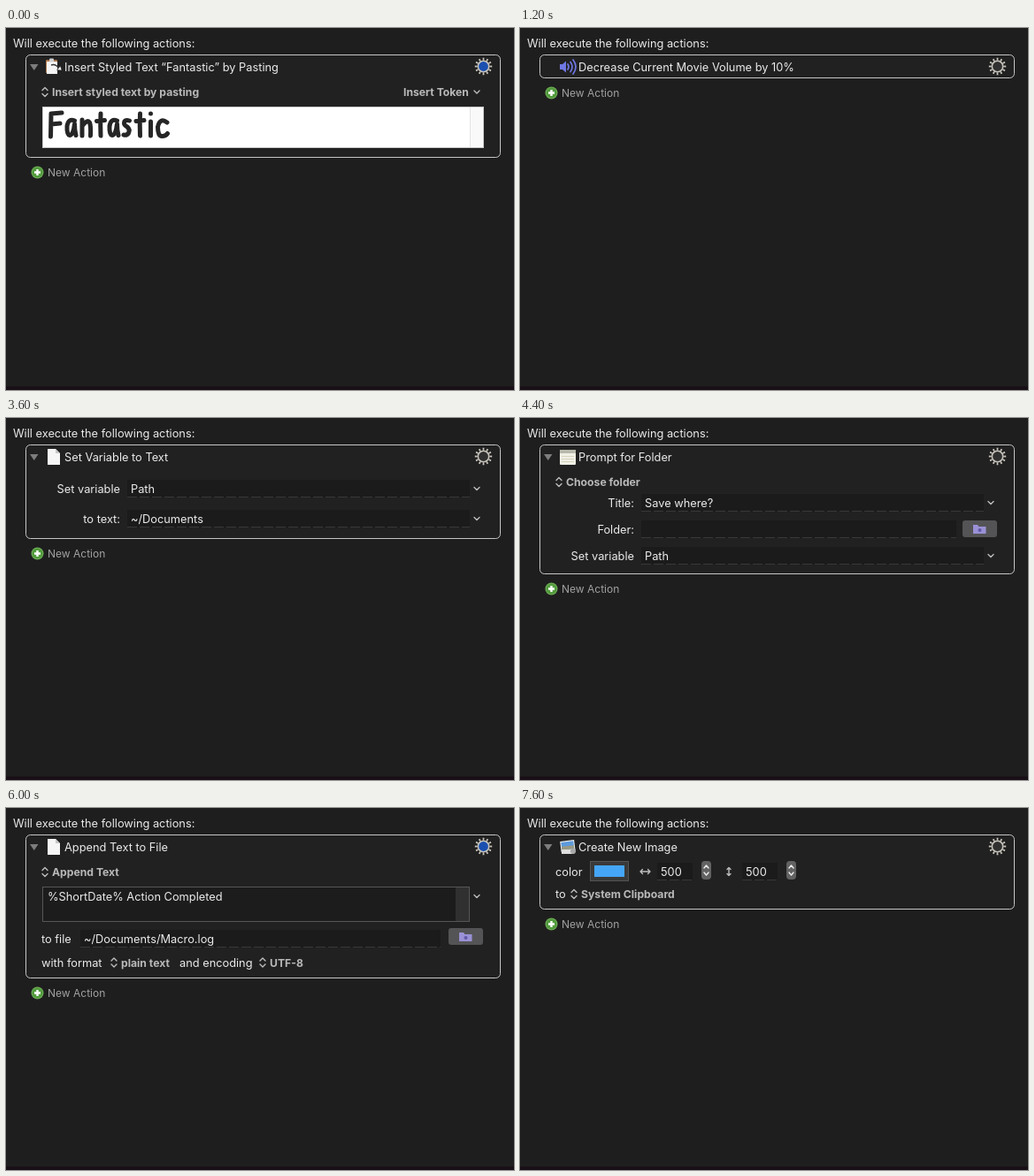
Animation, 574 px wide and 410 px high, one loop 8000 ms. Source, as an HTML page:

```html
<!DOCTYPE html>
<html lang="en">
<head>
<meta charset="utf-8">
<title>Macro actions</title>
<style>
  html, body { margin: 0; width: 100%; height: 100%; overflow: hidden; background: #1e1e1e; }
  svg { display: block; width: 574px; height: 410px; }
  text { font: 12.8px Inter, sans-serif; fill: #ebebeb; white-space: pre; }
  .bold { font-weight: 700; font-size: 12.2px; fill: #b9b9b9; }
  .dim { font-size: 12px; fill: #a2a2a2; }
  .end { text-anchor: end; }
  .sample { font: 18px "Liberation Sans", sans-serif; fill: #000; }
  .line { fill: none; stroke: #bdbdbd; stroke-width: 1.4; stroke-linecap: round; stroke-linejoin: round; }
  .ink { fill: none; stroke: #262626; stroke-width: 5; stroke-linecap: round; stroke-linejoin: round; }
</style>
</head>
<body>
<svg id="stage" viewBox="0 0 574 410"></svg>
<script>
// Every y given to a text or control helper is the centre of its row.
const text = (x, y, s, cls = '') => `<text x="${x}" y="${y + 4.5}" class="${cls}">${s}</text>`;
const box = (x, y, w, h, fill, more = '') =>
  `<rect x="${x}" y="${y}" width="${w}" height="${h}" fill="${fill}" ${more}/>`;
const path = (d, more = 'class="line"') => `<path d="${d}" ${more}/>`;
const disc = (x, y, r, fill, more = '') => `<circle cx="${x}" cy="${y}" r="${r}" fill="${fill}" ${more}/>`;

const chevron = (x, y) => path(`M${x - 3} ${y - 1.5}l3 3 3-3`);
const arrows = (x, y) => path(`M${x - 3} ${y - 2}l3-3 3 3M${x - 3} ${y + 2}l3 3 3-3`);
const select = (x, y, s) => arrows(x + 4, y) + text(x + 12, y, s, 'bold');

const field = (x, y, w, s = '') => box(x, y - 10, w, 20, '#1b1b1b') +
  path(`M${x} ${y + 9.5}h${w}`, 'stroke="#383838" stroke-dasharray="11 3"') + text(x + 4, y, s);
const folder = y => box(500, y - 10, 39, 19, '#545456', 'rx="3"') +
  path(`M512 ${y - 5}h5l1.500 2h8v8h-14.500z`, 'fill="#9a91d6"') + disc(519.5, y + 1, 2, '#6258a8');
const area = (y, h, s = '') => box(41.5, y + .5, 482, h - 1, '#1c1c1c', 'stroke="#565656"') +
  box(508, y + 1, 15, h - 2, '#303030') + text(47, y + 11, s) + chevron(532, y + 11);
const prompt = (y, label, s, button) => text(129, y, label, 'end') +
  (button ? field(137, y, 356) + folder(y) : field(137, y, 387, s) + chevron(532, y));
const check = (x, y, on) => box(x, y - 7, 14, 14, on ? '#2c69dc' : '#4c4c4c', 'rx="3"') +
  (on ? path(`M${x + 3.5} ${y}l2.800 3.200 4.500-6.500`, 'fill="none" stroke="#fff" stroke-width="1.7"') : '');
const well = (x, y, color) => box(x + .5, y - 11.5, 43, 22, '#393939', 'stroke="#545454"') +
  box(x + 5, y - 7, 34, 13, color);
const stepper = (x, y) => box(x, y - 12, 11, 21, '#626262', 'rx="4"') +
  path(`M${x + 3} ${y - 4}l2.500-3 2.500 3M${x + 3} ${y + 1}l2.500 3 2.500-3`, 'class="line" style="stroke:#eee"');
const fileRow = (y, label, s) => text(40, y, label) + field(84, y, 407, s) + folder(y - 2);

const icons = {
  clip: box(45, 36, 13, 15, '#a9764a', 'rx="1"') + box(46, 38, 12, 14, '#f4f4f4') +
    box(49, 34.5, 5, 4, '#d0d0d0', 'rx="1"') +
    path('M51 42q5-2 9 4', 'fill="none" stroke="#333" stroke-width="1.4"') +
    path('M63 48l-5.500-.500 4-4.500z', 'fill="#fff" stroke="#222" stroke-width=".6"'),
  sound: path('M45 41h3l4-3.500v13l-4-3.500h-3z', 'fill="#7078e4"') +
    path('M54 41q2 3 0 6M57 38.500q4 5.500 0 11M60 36q6 8 0 16',
      'fill="none" stroke="#7078e4" stroke-width="1.7" stroke-linecap="round"'),
  play: disc(54, 43.5, 8.5, '#86c95c') + disc(54, 41, 6, '#b7e291') +
    path('M52 39l6 4.500-6 4.500z', 'fill="#f6fff0"'),
  window: box(45, 36, 18, 17, '#f1f0e6', 'rx="1"') + box(45, 36, 18, 4, '#b9b9ac') +
    path('M47 43.500h14M47 46.500h14M47 49.500h14', 'stroke="#d6d4bd"'),
  page: path('M47 35h9l5 5v13h-14z', 'fill="#f6f6f6"') + path('M56 35v5h5z', 'fill="#c8c8c8"'),
  image: '<g transform="rotate(-7 54 44)">' + box(46, 37, 16, 12, '#f2f2f2') + box(47, 38, 14, 9, '#5d9bdc') +
    box(47, 43, 14, 4, '#9a9a83') + '</g>' + box(47, 47, 14, 5, '#dedede') + disc(60, 49, 3, '#a7a7a7')
};

const gear = blue => disc(539.5, 43.5, 8.3, 'none',
    'stroke="#c9c5bd" stroke-width="2.8" pathLength="24" stroke-dasharray=".8 1.2" stroke-dashoffset=".4"') +
  disc(539.5, 43.5, 6.2, blue ? '#1b50b0' : '#303030', 'stroke="#c9c5bd" stroke-width="1.6"');
const plus = y => disc(35.5, y, 7, '#71ad59') + disc(35.5, y, 6, '#519b3c') +
  path(`M32 ${y}h7M35.500 ${y - 3.5}v7`, 'stroke="#fff" stroke-width="2.4"') + text(47, y, 'New Action', 'dim');

// Marker lettering on a baseline of y = 123
const letterA = x => `M${x + 9} 105q-7-3-8.500 6-.500 10 3 10.500 4 0 5.500-13 0 8 1.500 13`;
const letterT = x => `M${x + 4.5} 97q-.500 14 0 25M${x} 105.500l9-1`;
const lettering = path('M51 97l-.500 26M51 97l12-1M51 109l10-1' + letterA(68.5) +
  'M86 104v18M86 111q6-8 8.500-4 1.500 4 1 15' + letterT(102.5) + letterA(116.5) +
  'M139.500 105q-6-2-6 3 0 2 3.500 4 3.500 3 1.500 7-2 3-5.500 2' + letterT(147) +
  'M163.500 106v16M163.500 97v.100M182 107q-8-6-10.500 5 0 11 5 10.500 4 0 6-3', 'class="ink" aria-label="Fantastic"');

const writeFile = (verb, h, s) => select(40, 72.5, verb) + area(89, h, s) +
  fileRow(108 + h, 'to file', '~/Documents/Macro.log') + text(40, 135 + h, 'with format') +
  select(118, 135 + h, 'plain text') + text(196, 135 + h, 'and encoding') + select(286, 135 + h, 'UTF-8');

const pasteBody = select(40, 72.5, 'Insert styled text by pasting') +
  text(449, 72.5, 'Insert Token', 'bold') + chevron(532, 72.5) +
  box(41.5, 89.5, 498, 46, '#fff', 'stroke="#c6c6c6"') + box(525, 90, 14, 45, '#f9f9f9') +
  path('M524.500 90v45', 'stroke="#e4e4e4"') + lettering;

const folderBody = select(40, 72.5, 'Choose folder') + prompt(96, 'Title:', 'Save where?') +
  prompt(126, 'Folder:', '', true) + prompt(156, 'Set variable', 'Path');

const styleBody = text(40, 72, 'Apply styles to') + select(140, 72, 'System Clipboard') +
  text(40, 98, 'Font') + select(79, 98, 'Delma') + select(223, 98, 'Regular') +
  text(40, 124, 'Size') + check(78, 124) + text(96, 124, 'Smaller') + check(151, 124) + text(169, 124, 'Bigger') +
  check(223, 124, true) + field(246, 124, 40, '18') + stepper(296, 124) +
  check(41, 154) + text(59, 154.5, 'Foreground') + well(140, 154, '#000') +
  check(200, 154, true) + text(218, 154.5, 'Background') + well(299, 154, '#b5d0f8') +
  [['Strikethrough', 182.5], ['Underline', 209.5], ['Superscript', 234.5]]
    .map(([s, y]) => text(40, y, s) + select(130, y, 'Unchanged')).join('') +
  text(40, 264.5, 'Sample:') + box(97, 253, 443, 30, '#fff') + box(101, 257, 99, 22, '#b4d2fb') +
  text(101, 269.5, 'Sample Text', 'sample') + text(40, 303.5, 'Apply to') + select(95, 303.5, 'whole string');

const imageBody = text(40, 72, 'color') + well(79, 72, '#45a6f8') +
  path('M136 72h11M138.500 69.500l-2.500 2.500 2.500 2.500M144.500 69.500l2.500 2.500-2.500 2.500') +
  field(155, 72, 40, '500') + stepper(205, 72) +
  path('M236 67.500v9M234 69.500l2-2 2 2M234 74.500l2 2 2-2') +
  field(251, 72, 40, '500') + stepper(301, 72) + text(40, 97.5, 'to') + select(57, 97.5, 'System Clipboard');

// icon, title, bottom of the panel, contents, blue gear
const actions = [
  ['clip', 'Insert Styled Text “Fantastic” by Pasting', 147, pasteBody, true],
  ['window', 'Display Text in Window', 140, select(40, 72.5, 'Display text in a window') + area(89, 40, 'Action Completed')],
  ['sound', 'Increase Current Movie Volume by 10%', 57],
  ['sound', 'Decrease Current Movie Volume by 10%', 57],
  ['play', 'Toggle Current Movie Playback', 57],
  ['play', 'Play Previous Track', 57],
  ['play', 'Play Next Track', 57],
  ['play', 'Play a Random Track', 57],
  ['play', 'Stop Playing the Current Track', 57],
  ['page', 'Set Variable to Text', 137, prompt(80, 'Set variable', 'Path') + prompt(114, 'to text:', '~/Documents')],
  ['window', 'Prompt for User Input', 225, prompt(76, 'Title:', 'Save where?') + area(97, 60) +
    prompt(174, 'Set variable', 'Name') + prompt(204, 'Set variable', 'Path')],
  ['window', 'Prompt for Folder', 177, folderBody],
  ['page', 'Write Text to File', 377, writeFile('Write Text', 224, 'Action Completed')],
  ['page', 'Delete File', 115, fileRow(84, 'file', '~/Documents/Macro.log')],
  ['page', 'Read File', 169, fileRow(80, 'file', '~/Documents/Macro.log') + text(40, 114, 'with format') +
    select(118, 114, 'plain text') + text(40, 146, 'to') + select(57, 146, 'System Clipboard')],
  ['page', 'Append Text to File', 193, writeFile('Append Text', 40, '%ShortDate% Action Completed'), true],
  ['clip', 'Set System Clipboard to Text', 147, select(40, 72.5, 'Set clipboard to text') + area(89, 46)],
  ['clip', 'Apply Style to System Clipboard', 324, styleBody],
  ['clip', 'Search and Replace System Clipboard', 292, select(40, 72.5, 'Search clipboard') +
    text(40, 98, 'Search for:') + area(110, 56) + text(40, 184, 'Replace with:') + area(196, 56) +
    text(40, 272, 'to') + select(57, 272, 'System Clipboard')],
  ['image', 'Create New Image', 115, imageBody]
];

const draw = ([icon, title, bottom, body, blue]) =>
  box(0, 406, 574, 4, '#181016') + text(8, 17.5, 'Will execute the following actions:') +
  box(22.5, 30.5, 536, bottom - 31, '#212121', 'rx="5" stroke="#c6c6c6"') +
  (body ? path('M27 41h9.500l-4.750 7z', 'fill="#7d7d7d"') + body : '') +
  icons[icon] + text(66, 44.5, title) + gear(blue) + plus(bottom + 16.5);

const stage = document.getElementById('stage');
const STEP = 400;
let shown = -1;
function tick() {
  const index = Math.floor(performance.now() / STEP) % actions.length;
  if (index !== shown) stage.innerHTML = draw(actions[shown = index]);
  requestAnimationFrame(tick);
}
tick();
</script>
</body>
</html>
```
